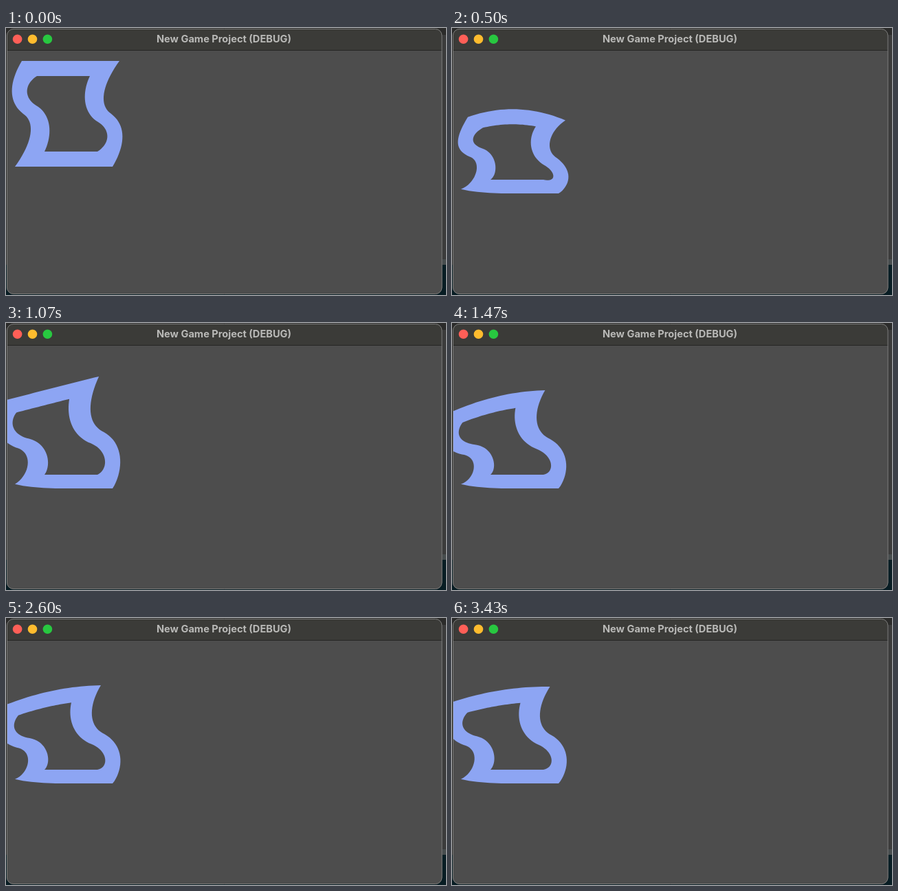
Recreate the animation shown at these times as an HTML page with a canvas. Size 640x389 px, loop 3.47 s.

```html
<!DOCTYPE html>
<html lang="en">
<head>
<meta charset="utf-8">
<title>Soft body</title>
<style>
  html, body { margin: 0; width: 100%; height: 100%; overflow: hidden; background: #2b2b2a; }
  canvas { display: block; width: 640px; height: 389px; }
</style>
</head>
<body>
<canvas id="stage" width="640" height="389"></canvas>
<script>
const ctx = document.getElementById('stage').getContext('2d');
const LOOP = 3470, STEP = 100 / 3, IMPACT = 0.29;
const LEFT = 16, WIDTH = 144, DROP = 38, FLOOR = 241;
const BODY = '#8da5f3', CONTENT = '#4d4d4d';
const CENTER = { x: 89, y: 125 };

// The left side of each ring is two joined cubics; the right side is its half turn.
const outerSide = [[23, 48], [4, 80], [3, 108], [25, 125], [43, 137], [39, 166], [13, 202]];
const innerSide = [[45, 70], [26, 82], [26, 102], [44, 113], [66, 126], [68, 155], [56, 180]];

const lerp = (a, b, k) => a + (b - a) * k;
const mix = (p, q, k) => p.map((value, i) => lerp(value, q[i], k));

function smooth(from, to, t) {
  const k = Math.max(0, Math.min(1, (t - from) / (to - from)));
  return k * k * (3 - 2 * k);
}

function cubicPoint(points, k) {
  while (points.length > 1) {
    points = points.slice(1).map((p, i) => mix(points[i], p, k));
  }
  return points[0];
}

// Points are [x, y, s], where s runs from 0 at the top to 1 at the bottom.
function sampleSide(side) {
  return Array.from({ length: 41 }, (_, i) => {
    const half = i < 20 ? 0 : 1;
    return [...cubicPoint(side.slice(half * 3, half * 3 + 4), i / 20 - half), i / 40];
  });
}

function sampleEdge(a, b) {
  return Array.from({ length: 23 }, (_, i) => mix(a, b, (i + 1) / 24));
}

function makeRing(side) {
  const left = sampleSide(side);
  const right = left.map(([x, y, s]) => [2 * CENTER.x - x, 2 * CENTER.y - y, 1 - s]);
  return [...left, ...sampleEdge(left[40], right[0]), ...right, ...sampleEdge(right[40], left[0])];
}

const outer = makeRing(outerSide), inner = makeRing(innerSide);

// After impact the top bounces like a damped spring while the body tips to the left.
function poseAt(t) {
  const since = t - 0.3;
  const recovery = (since / 3.13) ** 3;
  const drop = 26 + 40 * Math.exp(-1.2 * since) * Math.sin(6.3 * since - 0.553);
  return {
    drop,
    lean: -30 * smooth(0.3, 0.75, since) * (1 - 0.25 * recovery),
    tilt: 38 * smooth(0.45, 0.8, since) * (1 - 0.35 * recovery),
    arch: -0.4 * Math.max(0, drop - 11),
    sag: 20 + drop
  };
}

function warp([x, y, s], pose, isInner) {
  const u = (x - LEFT) / WIDTH, rest = 1 - s;
  const press = isInner ? 3 : 1.5 - 6 * (1 - u) ** 5;
  const dy = pose.drop * rest
    + pose.tilt * (0.5 - u) * (1 - s * s)
    + pose.arch * 4 * u * (1 - u) * rest
    + pose.sag * s ** 3 * rest
    + press * s;
  return [x + pose.lean * rest ** 1.5, Math.min(FLOOR, y + DROP + dy)];
}

function polygon(points) {
  points.forEach(([x, y], i) => i ? ctx.lineTo(x, y) : ctx.moveTo(x, y));
  ctx.closePath();
}

function drawBody(t) {
  const pose = poseAt(t), fall = 43 * (t / 0.3) ** 2;
  ctx.beginPath();
  for (const ring of [outer, inner]) {
    polygon(ring.map(p => t < IMPACT ? [p[0], p[1] + fall] : warp(p, pose, ring === inner)));
  }
  ctx.fillStyle = BODY;
  ctx.fill('evenodd');
}

function rect(color, x, y, w, h) {
  ctx.fillStyle = color;
  ctx.fillRect(x, y, w, h);
}

function windowPath(inset) {
  ctx.beginPath();
  ctx.roundRect(1 + inset, 1 + inset, 633.5 - 2 * inset, 387 - 2 * inset, 10 - inset);
}

function draw(t) {
  rect('#2b2b2a', 0, 0, 640, 389);
  rect('#3b3b3b', 634, 10, 6, 327);
  rect('#474d4e', 634, 337, 6, 8);
  rect('#081d24', 0, 345, 640, 44);

  ctx.save();
  windowPath(0);
  ctx.clip();
  rect(CONTENT, 0, 0, 640, 389);
  drawBody(t);
  rect('#3b3b38', 0, 0, 640, 32);
  rect('#252524', 0, 32, 640, 1);
  ctx.restore();

  windowPath(0.5);
  ctx.strokeStyle = '#7b7b7a';
  ctx.lineWidth = 1;
  ctx.stroke();

  ['#ff5f57', '#febc2e', '#28c840'].forEach((color, i) => {
    ctx.beginPath();
    ctx.arc(16.6 + i * 21.9, 16.2, 6.8, 0, Math.PI * 2);
    ctx.fillStyle = color;
    ctx.fill();
  });

  ctx.font = 'bold 14.6px Inter, sans-serif';
  ctx.textAlign = 'center';
  ctx.fillStyle = '#b9b9b7';
  ctx.fillText('New Game Project (DEBUG)', 317, 21);
}

const began = performance.now();
function tick() {
  const t = (performance.now() - began) % LOOP;
  draw(Math.min(103, Math.floor((t + 3.4) / STEP)) * STEP / 1000);
  requestAnimationFrame(tick);
}
tick();
</script>
</body>
</html>
```
